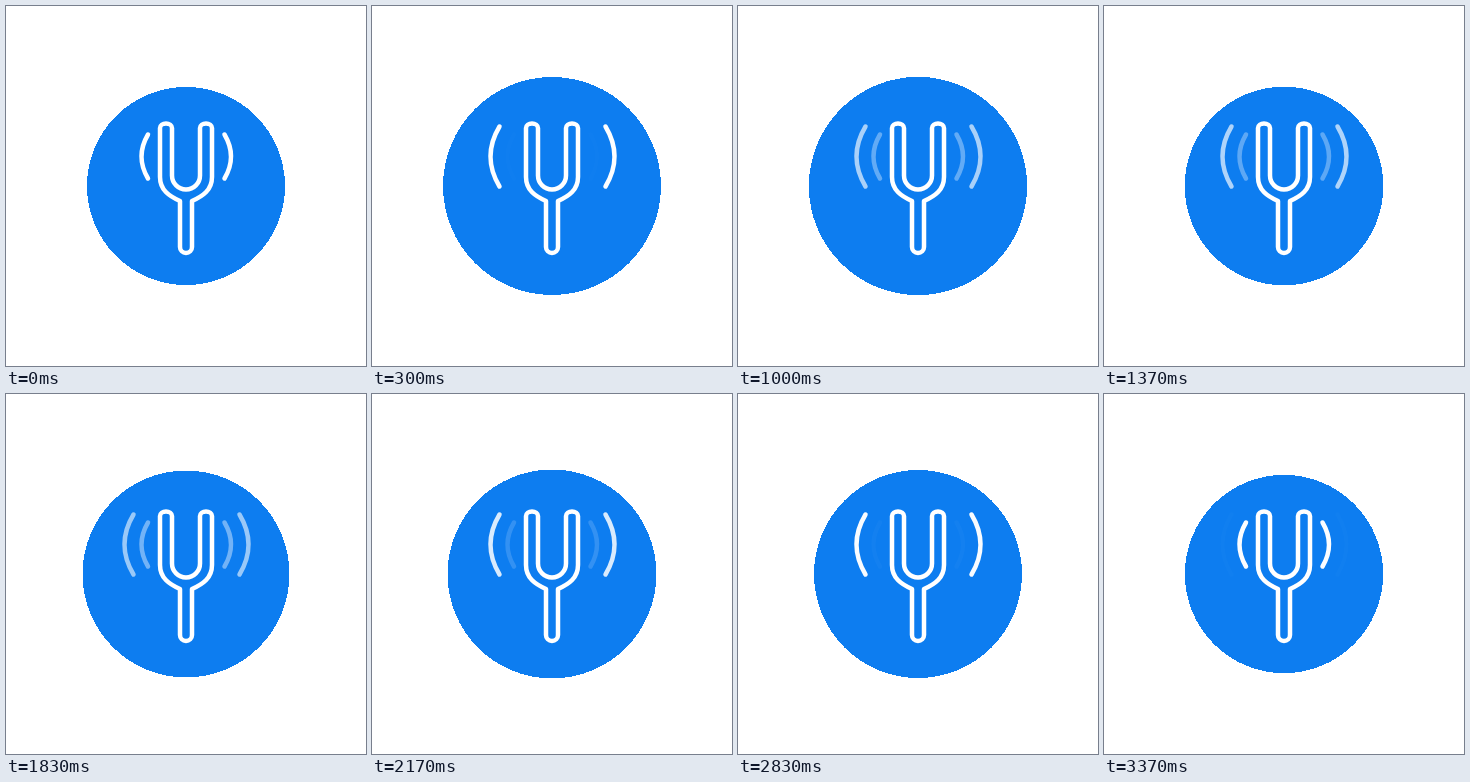
Recreate the animation shown at these times as an HTML page. Size 360 by 360 pixels, loop 3.41 s.

```html
<!DOCTYPE html>
<html lang="en">
<head>
<meta charset="utf-8">
<title>Tuning fork</title>
<style>
  html, body { margin: 0; width: 100%; height: 100%; overflow: hidden; background: #fff; }
  svg { display: block; width: 100vw; height: 100vh; }
  path { fill: none; stroke: #fff; stroke-width: 4.5; stroke-linecap: round; stroke-linejoin: round; }
</style>
</head>
<body>
<svg viewBox="0 0 360 360">
  <circle id="disc" cx="180" cy="180" r="99" fill="#0d7df0" shape-rendering="crispEdges"/>
  <path d="M154 122a6 4.5 0 0 1 12 0V169.500a14 14 0 0 0 28 0V122a6 4.500 0 0 1 12 0V171C206 184 197 190 186 195V241a6 6 0 0 1-12 0V195C163 190 154 184 154 171Z"/>
  <path id="near" d="M142 128.500Q129 150.500 142 172.500M218.500 128.500Q231.500 150.500 218.500 172.500"/>
  <path id="far" d="M127.500 120.500Q109.500 150.500 127.500 180.500M233.500 120.500Q251.500 150.500 233.500 180.500"/>
</svg>
<script>
const LOOP = 3410, STEP = 100 / 3, STEPS = 102;
const [disc, near, far] = ['disc', 'near', 'far'].map(id => document.getElementById(id));

// cubic-bezier(0, 0, .58, 1), solved by bisection
function easeOut(x) {
  if (x <= 0) return 0;
  if (x >= 1) return 1;
  let lo = 0, hi = 1;
  for (let i = 0; i < 24; i++) {
    const s = (lo + hi) / 2;
    if (1.74 * (1 - s) * s * s + s ** 3 < x) lo = s; else hi = s;
  }
  return 3 * lo * lo - 2 * lo ** 3;
}

// Rises during the first part of each period, falls during the second half
const pulse = (time, period, rise) => {
  const phase = time / period % 1;
  return phase < .5 ? easeOut(phase / rise) : 1 - easeOut(phase * 2 - 1);
};

function draw(now) {
  const step = Math.min(STEPS - 1, Math.floor((now % LOOP + 5) / STEP));
  const time = step * STEP;
  const wave = pulse(time, 850, .38);
  disc.setAttribute('r', 99 + 10.2 * pulse(time, 680, .5));
  near.style.opacity = 1 - wave;
  far.style.opacity = wave;
}

const start = performance.now();
function tick() {
  draw(performance.now() - start);
  requestAnimationFrame(tick);
}
tick();
</script>
</body>
</html>
```
